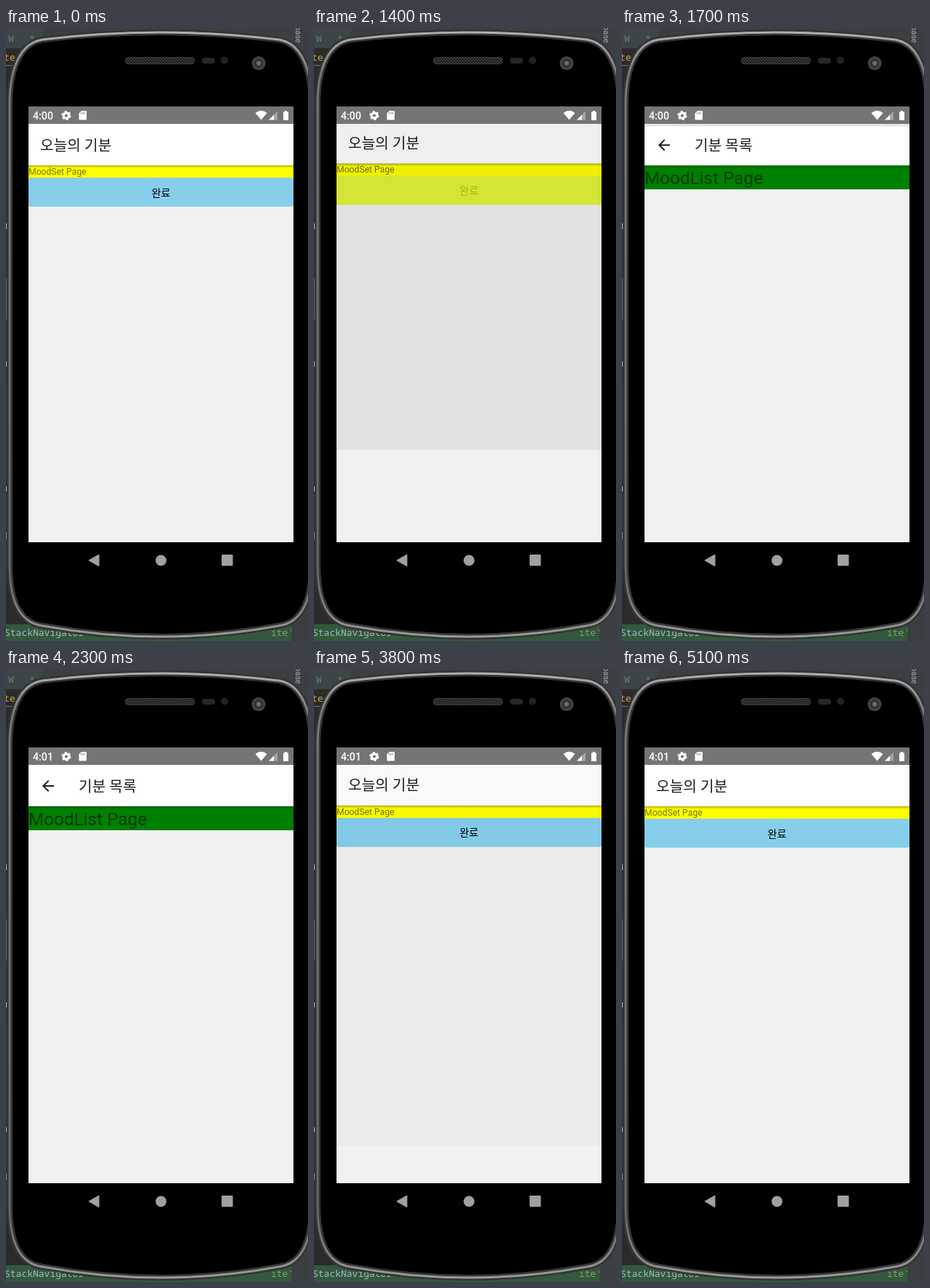
An HTML page that plays this animation: 416x844 px, repeating every 5800 ms.

```html
<!DOCTYPE html>
<html lang="ko">
<head>
<meta charset="utf-8">
<title>Mood app</title>
<style>
html, body { margin: 0; width: 100%; height: 100%; overflow: hidden; background: #2b2b2b; }
svg { display: block; width: 416px; height: 844px; }
text { font-family: Roboto, "Noto Sans CJK KR", "Noto Sans CJK", sans-serif; white-space: pre; }
.code { font: 13px "Noto Sans Mono", monospace; }
.title { font-size: 20.3px; fill: #1c1c1e; }
.muted { fill: #000; fill-opacity: .54; }
</style>
</head>
<body>
<svg viewBox="0 0 416 844">
  <defs>
    <linearGradient id="shade" x2="0" y2="1">
      <stop stop-color="#000" stop-opacity=".3"/>
      <stop offset="1" stop-color="#000" stop-opacity="0"/>
    </linearGradient>
    <linearGradient id="rim" x2="0" y2="1">
      <stop stop-color="#b0b0b0"/>
      <stop offset=".07" stop-color="#777"/>
      <stop offset=".9" stop-color="#666"/>
      <stop offset="1" stop-color="#999"/>
    </linearGradient>
    <pattern id="mesh" width="4" height="4" patternUnits="userSpaceOnUse">
      <rect width="4" height="4" fill="#1c1c1c"/>
      <circle cx="1" cy="1" r=".9" fill="#4a4a4a"/>
      <circle cx="3" cy="3" r=".9" fill="#4a4a4a"/>
    </pattern>
    <clipPath id="screen"><rect x="31" y="108" width="365" height="600"/></clipPath>
    <clipPath id="reveal"><rect id="window" x="31" y="132" width="365" height="576"/></clipPath>
  </defs>

  <!-- editor behind the phone -->
  <rect width="416" height="844" fill="#2b2b2b"/>
  <rect width="416" height="28" fill="#3c3f41"/>
  <rect width="50" height="27" fill="#3d4647"/>
  <rect x="393" width="23" height="844" fill="#3c3f41"/>
  <g class="code">
    <text class="code" x="3" y="19" fill="#6f7b80">W</text>
    <text class="code" x="32" y="20" fill="#6f7b80">*</text>
    <text class="code" x="-3" y="45" fill="#d9a343">te</text>
    <rect y="51" width="12" height="1" fill="#4f8a5b"/>
    <rect y="345" width="2" height="56" fill="#606366"/>
    <rect y="269" width="1" height="8" fill="#a9b7c6"/>
    <rect y="459" width="1" height="7" fill="#a9b7c6"/>
    <rect y="631" width="1" height="7" fill="#a9b7c6"/>
    <rect y="694" width="1" height="10" fill="#7678b5"/>
    <rect y="821" width="393" height="23" fill="#32593d"/>
    <text class="code" x="-2" y="837" fill="#a9b7c6">StackNavigator</text>
    <text class="code" x="365" y="837" fill="#8a9a6a">ite'</text>
  </g>
  <text transform="translate(399 -3) rotate(90)" font-size="11" fill="#a5a8aa">base</text>

  <!-- phone body -->
  <g id="body">
    <path id="shell" d="M5 105C5 55 20 21 50 16Q213 -4 376 16C406 21 421 55 421 105V740C421 790 406 819 376 823Q213 853 50 823C20 819 5 790 5 740Z" stroke="#353535" stroke-width="8"/>
    <use href="#shell" fill="none"/>
    <path d="M5 105C5 55 20 21 50 16Q213 -4 376 16C406 21 421 55 421 105V740C421 790 406 819 376 823Q213 853 50 823C20 819 5 790 5 740Z" fill="none" stroke="url(#rim)" stroke-width="3"/>
  </g>
  <rect x="164.500" y="40.500" width="95" height="9" rx="4" fill="url(#mesh)" stroke="#3c3c3c"/>
  <rect x="270" y="41" width="18" height="8" rx="4" fill="#262626"/>
  <circle cx="301" cy="44.500" r="5" fill="#222"/>
  <circle cx="348" cy="48.500" r="9.500" fill="#454545"/>
  <circle cx="348" cy="48.500" r="6.500" fill="#303438"/>
  <circle cx="348" cy="48.500" r="3" fill="#667079"/>

  <g clip-path="url(#screen)">
    <rect x="31" y="132" width="365" height="576" fill="#f1f1f1"/>
    <g id="home">
      <rect x="31" y="132" width="365" height="576" fill="#f1f1f1"/>
      <rect x="31" y="189" width="365" height="57" fill="#ff0"/>
      <text class="muted" x="31" y="202" font-size="12.2">MoodSet Page</text>
      <g id="button">
        <rect x="31" y="206" width="365" height="40" rx="3.500" fill="#87ceeb"/>
        <text x="213.500" y="231.500" font-size="14.2" text-anchor="middle">완료</text>
      </g>
      <rect x="31" y="132" width="365" height="57" fill="#fff"/>
      <rect x="31" y="189" width="365" height="4" fill="url(#shade)"/>
      <text class="title" x="47" y="168.500">오늘의 기분</text>
    </g>
    <rect id="dim" x="31" y="108" width="365" height="600"/>
    <g id="list" clip-path="url(#reveal)">
      <g id="card">
        <rect x="31" y="132" width="365" height="576" fill="#f1f1f1"/>
        <rect x="31" y="189" width="365" height="33" fill="#008000"/>
        <text class="muted" x="31" y="215" font-size="24.3">MoodList Page</text>
        <rect x="31" y="132" width="365" height="57" fill="#fff"/>
        <rect x="31" y="189" width="365" height="4" fill="url(#shade)"/>
        <path transform="translate(46 149)" d="M20 11H7.830l5.590-5.590L12 4l-8 8 8 8 1.410-1.410L7.830 13H20z" fill="#1c1c1e"/>
        <text class="title" x="100" y="168.500">기분 목록</text>
      </g>
    </g>
  </g>

  <!-- status bar -->
  <rect x="31" y="108" width="365" height="24" fill="#757575"/>
  <g fill="#fff">
    <text id="clock" x="37" y="126" font-size="14.2" font-weight="500"></text>
    <circle cx="83" cy="120.500" r="3.700" fill="none" stroke="#fff" stroke-width="3.200"/>
    <circle cx="83" cy="120.500" r="5.600" fill="none" stroke="#fff" stroke-width="2" stroke-dasharray="2.930"/>
    <path d="M104 114h6q1 0 1 1v10.500q0 1-1 1h-8.500q-1 0-1-1V117.500z"/>
    <path d="M103.500 116.500v2M105.700 116v2.500M108 116v2.500" stroke="#757575"/>
    <path d="M343.500 117Q351.500 110.500 359.500 117L351.500 126.500Z"/>
    <path d="M374 114.500V126.500H362Z" opacity=".35"/>
    <path d="M369 119.500V126.500H362Z"/>
    <path d="M384 114h3v1.500h2V127h-7V115.500h2z"/>
  </g>

  <!-- navigation bar -->
  <rect x="31" y="708" width="365" height="49"/>
  <g fill="#a0a0a0">
    <path d="M128 725V741L114 733Z" stroke="#a0a0a0" stroke-linejoin="round"/>
    <circle cx="213.500" cy="733" r="7.500"/>
    <rect x="297" y="725" width="15.500" height="15.500" rx="1"/>
  </g>
</svg>
<script>
const LOOP = 5800, STEP = 100, TOP = 132, HEIGHT = 576;
const PRESS = 1200, RELEASE = 1360, OPEN = 1348, CLOSE = 3598, SLIDE = 425;
const el = id => document.getElementById(id);
const clamp = v => Math.min(1, Math.max(0, v));

// cubic-bezier(.35, .45, 0, 1)
function ease(x) {
  if (x <= 0 || x >= 1) return clamp(x);
  const curve = (s, a, b) => 3 * (1 - s) ** 2 * s * a + 3 * (1 - s) * s * s * b + s ** 3;
  let low = 0, high = 1;
  for (let i = 0; i < 24; i++) {
    const mid = (low + high) / 2;
    if (curve(mid, .35, 0) < x) low = mid; else high = mid;
  }
  return curve(low, .45, 1);
}

const inOutQuad = x => x < .5 ? 2 * x * x : 1 - 2 * (1 - x) ** 2;

function buttonOpacity(t) {
  return t < PRESS ? 1 : .2 + .8 * inOutQuad(clamp((t - RELEASE) / 250));
}

function moveY(id, y) {
  el(id).setAttribute("transform", `translate(0 ${y})`);
}

function draw(t) {
  const shown = ease((t - OPEN) / SLIDE) - ease((t - CLOSE) / SLIDE);
  const hidden = 1 - shown;
  el("clock").textContent = t < 2300 ? "4:00" : "4:01";
  el("button").setAttribute("opacity", buttonOpacity(t));
  moveY("home", -.02 * HEIGHT * shown);
  moveY("card", .041 * HEIGHT * hidden);
  el("dim").setAttribute("opacity", .1 * clamp(shown / .36));
  el("window").setAttribute("y", TOP + HEIGHT * hidden);
  el("list").setAttribute("visibility", shown > 0 ? "visible" : "hidden");
}

const start = performance.now();
function tick() {
  const t = (performance.now() - start) % LOOP;
  draw(Math.floor(t / STEP) * STEP);
  requestAnimationFrame(tick);
}
tick();
</script>
</body>
</html>
```
